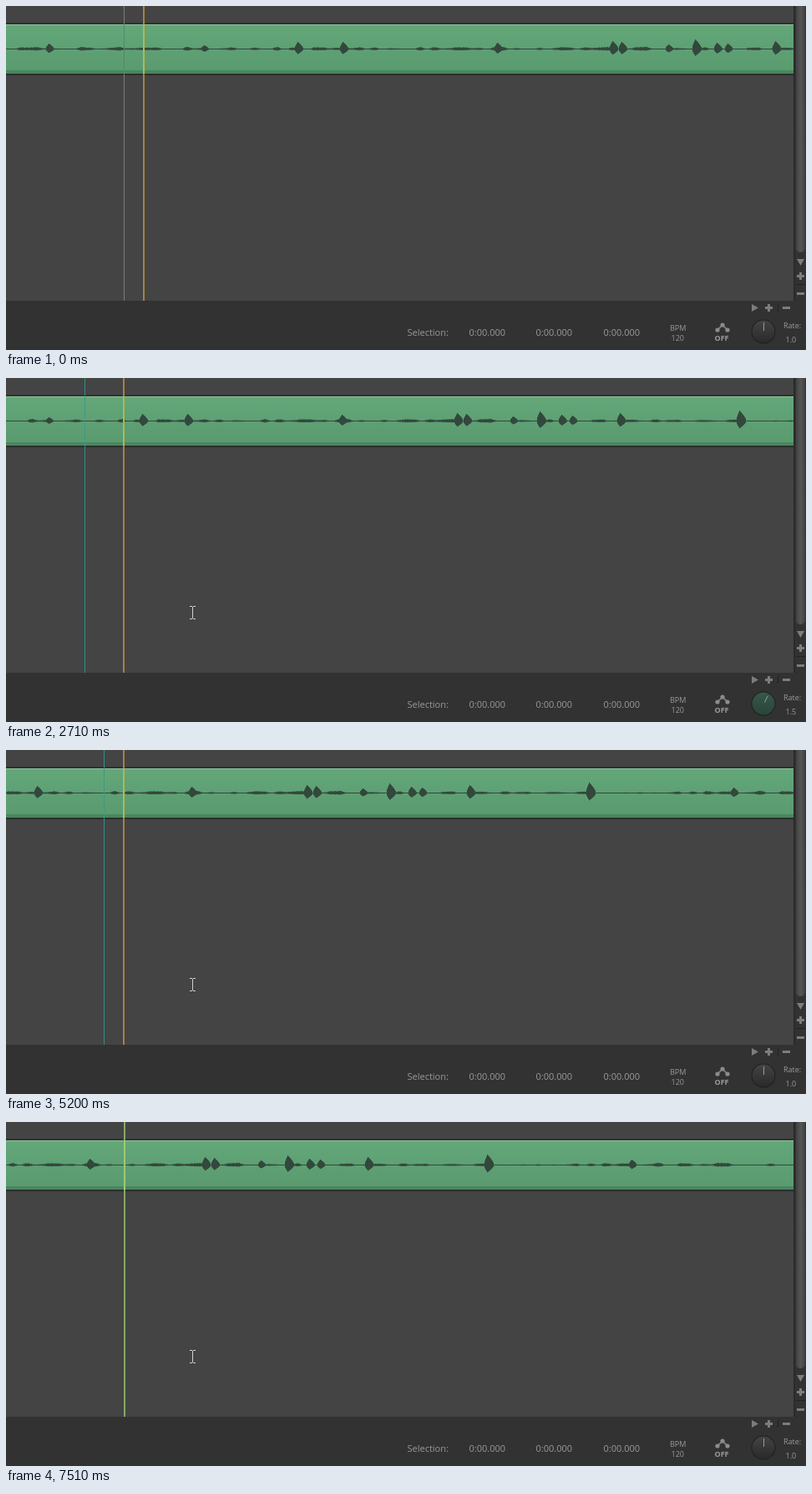
Animation, 958 px wide and 412 px high, one loop 8000 ms. Source, as an HTML page with a canvas:

```html
<!DOCTYPE html>
<html lang="en">
<head>
<meta charset="utf-8">
<title>Audio editor playback</title>
<style>
  html, body { margin: 0; width: 100%; height: 100%; overflow: hidden; background: #323232; }
  canvas { display: block; }
</style>
</head>
<body>
<canvas id="stage" width="958" height="412"></canvas>
<script>
const ctx = document.getElementById('stage').getContext('2d');
const LOOP = 8000, STEP_MS = 135.5, LAST_STEP = 55;
const VIEW_W = 943, VIEW_H = 353, PLAY_X = 141, AXIS = 51;
const FONT = '"Open Sans", sans-serif', TEXT = '#9b9b9b', ICON = '#7d7d7d';

// Times are counted in screen refreshes; the rate is 1.5 between FAST_FROM and FAST_TO.
const FAST_FROM = 15.6, FAST_TO = 34.8;
const playPath = [[0, 165], [8, 226], [14, 269], [FAST_FROM, 280], [26, 390],
  [FAST_TO, 483], [45, 559], [LAST_STEP, 629]];

// Loud syllables of the recording: [position, height]
const peaks = [[51, 6], [237, 4], [349, 8], [403, 8], [588, 7], [726, 9], [737, 8],
  [793, 5], [825, 11], [851, 7], [864, 6], [921, 9], [1064, 12], [1237, 6]];

function hash(n) {
  const s = Math.sin(n * 127.1) * 43758.5;
  return s - Math.floor(s);
}

// Smooth seeded noise between 0 and 1.
function noise(x) {
  const cell = Math.floor(x), f = x - cell, ease = f * f * (3 - 2 * f);
  return hash(cell) * (1 - ease) + hash(cell + 1) * ease;
}

function waveHeight(x) {
  const murmur = 4 * Math.max(0, noise(x / 9) - .4) * (.6 + .4 * hash(x));
  return Math.max(murmur, ...peaks.map(([at, height]) => {
    const d = x - at, half = d < 0 ? 4 : 4 + height / 3;
    return height * Math.max(0, 1 - Math.abs(d) / half) ** .7;
  }));
}

function rect(x, y, w, h, color) {
  ctx.fillStyle = color;
  ctx.fillRect(x, y, w, h);
}

function gradient(x0, y0, x1, y1, ...colors) {
  const g = ctx.createLinearGradient(x0, y0, x1, y1);
  colors.forEach((c, i) => g.addColorStop(i / (colors.length - 1), c));
  return g;
}

function text(str, x, y, size, weight = 400) {
  ctx.font = `${weight} ${size}px ${FONT}`;
  ctx.fillStyle = TEXT;
  ctx.fillText(str, x, y);
}

function polygon(...points) {
  ctx.fillStyle = ICON;
  ctx.beginPath();
  points.forEach(p => ctx.lineTo(...p));
  ctx.fill();
}

function polyline(color, width, ...points) {
  ctx.strokeStyle = color;
  ctx.lineWidth = width;
  ctx.beginPath();
  points.forEach(p => ctx.lineTo(...p));
  ctx.stroke();
}

function disc(x, y, r, fill) {
  ctx.fillStyle = fill;
  ctx.beginPath();
  ctx.arc(x, y, r, 0, Math.PI * 2);
  ctx.fill();
}

function minus(x, y) { rect(x - 4.5, y - 1.5, 9, 3, ICON); }
function plus(x, y) { minus(x, y); rect(x - 1.5, y - 4.5, 3, 9, ICON); }

function drawTrack(scroll) {
  rect(0, 0, VIEW_W, VIEW_H, '#444');
  rect(0, 20, VIEW_W, 2, '#303030');
  rect(0, 22, VIEW_W, 59, gradient(0, 22, 0, 81, '#63a879', '#5ea074', '#599b6f'));
  rect(0, 22, VIEW_W, 1, '#8ac79b');
  rect(0, 77, VIEW_W, 4, '#4b8660');
  rect(0, 81, VIEW_W, 2, '#292f2b');
  rect(0, AXIS, VIEW_W, 1, '#33483c');
  for (let x = 0; x < VIEW_W; x++) {
    const up = waveHeight(x + scroll);
    rect(x, AXIS - up, 1, up * 1.7 + 1, '#33483c');
  }
}

function verticalLine(x, width, color, itemColor) {
  rect(x, 0, width, VIEW_H, color);
  rect(x, 22, width, 59, itemColor);
}

function drawPointer(step) {
  if (step < 5) return;
  const remaining = Math.max(0, 1 - (step - 5) / 2);
  const y = Math.round(281 + 87 * remaining ** 2);
  rect(223, y - 7, 1, 14, '#d0d0d0');
  for (const edge of [y - 8, y + 7]) {
    rect(220, edge, 3, 1, '#d0d0d0');
    rect(224, edge, 3, 1, '#d0d0d0');
  }
}

function drawPanels() {
  rect(VIEW_W, 0, 15, 412, '#323232');
  rect(0, VIEW_H, 958, 59, '#323232');
  rect(VIEW_W, 0, 2, VIEW_H, '#2b2b2b');
  ctx.fillStyle = gradient(946, 0, 957, 0, '#404040', '#555', '#424242');
  ctx.beginPath();
  ctx.roundRect(946, -10, 11, 305, 5);
  ctx.fill();
  polygon([947, 303], [956, 303], [951.5, 311]);
  plus(951.5, 323.5);
  rect(946, 333, 12, 1, '#222');
  minus(951.5, 344.5);
  polygon([893, 357], [901, 361.5], [893, 366]);
  plus(913.5, 361.5);
  rect(924, 357, 1, 9, '#222');
  minus(934.5, 361.5);
}

function drawTransport(fast) {
  text('Selection:', 480.5, 395, 11);
  for (const x of [554.5, 634.5, 715.5]) text('0:00.000', x, 395, 11);
  text('BPM', 795, 389, 9);
  text('120', 796.5, 401, 9);

  const nodes = [[852, 388], [858, 382], [864, 388]];
  polyline('#8c8c8c', 1.5, ...nodes);
  for (const [x, y] of nodes) disc(x, y, 2.6, '#8c8c8c');
  text('OFF', 848.5, 401, 9, 700);

  const face = fast ? ['#35584a', '#2a4438'] : ['#444', '#292929'];
  disc(907, 390, 14.5, '#1f1f1f');
  disc(907, 390, 13.5, gradient(0, 376, 0, 404, ...face));
  if (fast) polyline('#8fa99c', 1, [908.5, 388.5], [912, 381]);
  else rect(907, 379, 1, 10, '#999');
  text('Rate:', 931, 386, 9);
  text(fast ? '1.5' : '1.0', 933.5, 403, 9);
}

function playPosition(step) {
  const i = playPath.findIndex(([at]) => at >= step) || 1;
  const [s0, p0] = playPath[i - 1], [s1, p1] = playPath[i];
  return Math.round(p0 + (p1 - p0) * (step - s0) / (s1 - s0));
}

// The edit cursor jumps to the play position on each rate change and on stop.
function editPosition(step) {
  const jump = [LAST_STEP, FAST_TO, FAST_FROM].find(at => at <= step);
  return jump ? playPosition(jump) : PLAY_X;
}

function draw(step) {
  const position = playPosition(step);
  const scroll = step === 0 ? 0 : position - PLAY_X;
  const editX = editPosition(step) - scroll;
  const lit = step % 11.6 > 3;

  drawTrack(scroll);
  if (step === LAST_STEP) {
    verticalLine(editX, 2, '#86a963', '#a3c673');
  } else {
    if (lit) verticalLine(editX, 1, '#2b9186', '#3a9a83');
    else verticalLine(editX, 1, '#7c7c7c', '#4f8b66');
    verticalLine(position - scroll - 1, 2, '#a08440', '#b7b553');
  }
  drawPanels();
  drawTransport(step >= FAST_FROM && step < FAST_TO);
  drawPointer(step);
}

let shown = -1;
function tick() {
  const now = performance.now() % LOOP;
  const step = Math.min(LAST_STEP, Math.floor(now / STEP_MS));
  if (step !== shown) draw(shown = step);
  requestAnimationFrame(tick);
}
tick();
</script>
</body>
</html>
```
